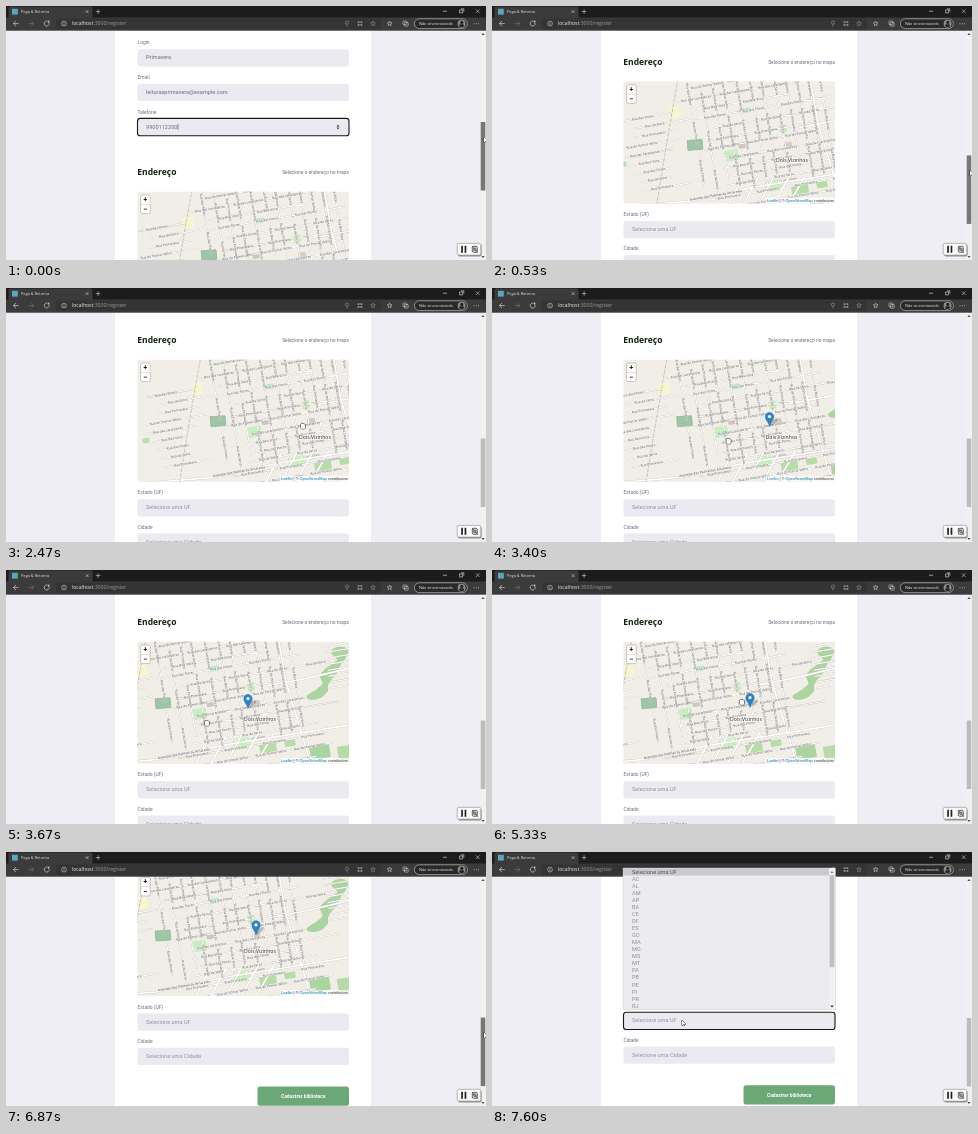
An HTML page with a canvas for the animation above (8 s loop, 480 by 254 pixels).

```html
<!DOCTYPE html>
<html lang="pt-BR">
<head>
<meta charset="utf-8">
<title>Cadastro</title>
<style>
html, body { margin: 0; width: 100%; height: 100%; overflow: hidden; background: #efeef4; }
canvas { display: block; width: 100vw; height: 100vh; }
</style>
</head>
<body>
<canvas id="stage"></canvas>
<script>
const W = 480, H = 254, LOOP = 8000, STEP = 200 / 3;
const canvas = document.getElementById('stage');
const c = canvas.getContext('2d');
const dpr = Math.max(1, window.devicePixelRatio || 1);
canvas.width = W * dpr;
canvas.height = H * dpr;

const UI = 'Roboto, sans-serif', CHROME = '"Open Sans", sans-serif', MAP = '"Noto Sans", sans-serif';
const STATES = 'AC AL AM AP BA CE DF ES GO MA MG MS MT PA PB PE PI PR RJ'.split(' ');
const OPEN_LIST = 7330;

// ---- motion ----
const ramp = (t, from, to) => Math.min(1, Math.max(0, (t - from) / (to - from)));
const scrollAt = t => 114 * ramp(t, 67, 550) + 51 * ramp(t, 6400, 6880);
const thumbAt = t => 116 + 0.303 * scrollAt(t);
const panAt = t => {
  const nudge = ramp(t, 1070, 1270), drag = ramp(t, 3270, 3640);
  return [46 + 9 * nudge - 55 * drag, 2 - 2 * nudge];
};

// Pointer moves; without a height the pointer holds the scrollbar thumb.
const MOVES = [
  { from: 935, to: 1270, x: 251, y: 114 },
  { from: 1400, to: 2130, x: 297, y: 138 },
  { from: 2670, to: 3070, x: 256, y: 153 },
  { from: 3270, to: 3640, x: 201, y: 153 },
  { from: 3700, to: 4130, x: 258, y: 137 },
  { from: 4870, to: 5330, x: 250, y: 132 },
  { from: 5600, to: 5800, x: 428, y: 100 },
  { from: 5940, to: 6200, x: 478 },
  { from: 6880, to: 7270, x: 190, y: 168 }
];
function pointerAt(t) {
  const grip = thumbAt(t) + 15;
  let x = 478, y = grip;
  for (const m of MOVES) {
    const p = ramp(t, m.from, m.to);
    x += (m.x - x) * p;
    y += ((m.y ?? grip) - y) * p;
  }
  return [x, y];
}

// Each click puts the pin under the pointer.
function pinAt(t) {
  const click = [5600, 4600, 2470].find(at => at <= t);
  if (!click) return null;
  const [x, y] = pointerAt(click), [px, py] = panAt(click);
  return [x - px, y - py - 71.5];
}

// ---- drawing helpers ----
function rect(x, y, w, h, fill) {
  c.fillStyle = fill;
  c.fillRect(x, y, w, h);
}
function paint(fill, stroke, lw) {
  if (fill) { c.fillStyle = fill; c.fill(); }
  if (stroke) { c.strokeStyle = stroke; c.lineWidth = lw; c.stroke(); }
}
function round(x, y, w, h, r, fill, stroke, lw = 0.7) {
  c.beginPath();
  c.roundRect(x, y, w, h, r);
  paint(fill, stroke, lw);
}
function disc(x, y, r, fill, stroke, lw = 0.7) {
  c.beginPath();
  c.arc(x, y, r, 0, 7);
  paint(fill, stroke, lw);
}
function line(color, lw, ...pts) {
  c.beginPath();
  for (let i = 0; i < pts.length; i += 2) c.lineTo(pts[i], pts[i + 1]);
  paint(null, color, lw);
}
function text(s, x, y, size, fill, family = UI, weight = 400, align = 'left', halo = 0) {
  c.font = `${weight} ${size}px ${family}`;
  c.textAlign = align;
  c.textBaseline = 'middle';
  if (halo) {
    c.strokeStyle = 'rgba(255,255,255,.7)';
    c.lineWidth = halo;
    c.strokeText(s, x, y);
  }
  c.fillStyle = fill;
  c.fillText(s, x, y);
}
// Runs fn in axes moved to x, y and turned.
function placed(x, y, turn, fn) {
  c.save();
  c.translate(x, y);
  c.rotate(turn);
  fn();
  c.restore();
}
// A small triangle pointing up (-1) or down (1).
function triangle(x, y, dir, color, r = 1.7) {
  c.beginPath();
  c.moveTo(x - r, y - dir);
  c.lineTo(x + r, y - dir);
  c.lineTo(x, y + dir);
  paint(color);
}
function cross(x, y, r, color) {
  line(color, 0.6, x - r, y - r, x + r, y + r);
  line(color, 0.6, x - r, y + r, x + r, y - r);
}
function random(seed) {
  return () => (seed = (seed * 16807) % 2147483647) / 2147483647;
}

// ---- map ----
const TILT = -0.17, TOWN = [222, 60];
const NAMES = ['Rua das Flores', 'Rua da Serra', 'Rua Primavera', 'Rua do Pomar Velho', 'Rua das Laranjeiras', 'Rua Boa Vista'];
const streets = new Path2D(), labels = [];

function addStreet(u, v, length, steep, name) {
  streets.moveTo(u, v);
  streets.lineTo(u + (steep ? 0 : length), v + (steep ? length : 0));
  for (let d = 19; d < length - 12; d += 39) {
    labels.push({ x: u + (steep ? 0 : d), y: v + (steep ? d : 0), turn: steep ? Math.PI / 2 : 0, name });
  }
}
(function layTown() {
  const rnd = random(4711);
  for (let u = -62, i = 0; u < 80; u += 10 + rnd() * 4, i++) {
    addStreet(u, -80 + rnd() * 16, 95 + rnd() * 25, true, NAMES[i % 6]);
  }
  for (let v = -66, i = 0; v < 72; v += 8 + rnd() * 4, i++) {
    addStreet(-80 + rnd() * 50, v, 95 + rnd() * 65, false, NAMES[(i + 3) % 6]);
  }
  for (let i = 0; i < 9; i++) addStreet(-145 + rnd() * 30, -45 + i * 9, 30 + rnd() * 40, false, NAMES[i % 6]);
  for (let i = 0; i < 8; i++) addStreet(104, -38 + i * 6, 30, false, '');
})();

const GREENS = [
  { at: [136, 29], size: [11, 11], color: '#f7f6cf' },
  { at: [194, 72], size: [13, 11], color: '#c4f0c0' },
  { at: [207, 27], size: [11, 5], color: '#b5ecca' },
  { at: [245, 45], size: [7, 8], color: '#bdf0b3' },
  { at: [85, 81], size: [7, 5], color: '#b7dfb5' },
  { at: [236, 102], size: [17, 11], color: '#c8f2bd' },
  { at: [262, 106], size: [17, 9], color: '#b4dea6' },
  { at: [284, 101], size: [11, 7], color: '#b4dea6' },
  { at: [314, 110], size: [20, 14], color: '#aad4a0' },
  { at: [339, 112], size: [14, 16], color: '#b8daa9' },
  { at: [204, 62], size: [7, 6], color: '#cdc5be' },
  { at: [250, 61], size: [8, 5], color: '#d5cbc3' },
  { at: [252, 97], size: [14, 4], color: '#cfc8c2' }
];

// Overlapping rough patches along an S-shaped hillside.
function forest() {
  const rnd = random(29);
  for (let i = 0; i <= 24; i++) {
    const p = i / 24, w = 5 + 3 * Math.cos(p * 4 * Math.PI);
    c.beginPath();
    c.ellipse(333 - 25 * p ** 1.8 + 3 * Math.sin(p * 9), 9 + 45 * p, w + rnd(), 3.2 + rnd(), TILT, 0, 7);
    paint('#aad4a0');
  }
}

// Broad avenues: two crossing the town and a fan in the south.
function avenues(color, lw) {
  for (let k = 0; k < 5; k++) line(color, lw, 188 + k * 15, 126, 204 + k * 16, 95 - k);
  line(color, lw, 76, 124, 150, 118, 215, 104, 345, 83);
  line(color, lw, 262, 44, 300, 37, 346, 26);
  line(color, lw, 272, -5, 280, 40, 306, 126);
}

function drawLand() {
  rect(0, -20, W, 180, '#f1eee8');
  forest();
  for (const { at: [x, y], size: [w, h], color } of GREENS) {
    placed(x, y, TILT, () => round(-w / 2, -h / 2, w, h, 1.2, color));
  }
  c.lineCap = c.lineJoin = 'round';
  for (const [color, extra] of [['#c8c2bd', 0.55], ['#fff', 0]]) {
    placed(...TOWN, TILT, () => {
      c.strokeStyle = color;
      c.lineWidth = 1 + extra;
      c.stroke(streets);
    });
    avenues(color, 1.7 + extra);
  }
  c.setLineDash([3, 2]);
  c.beginPath();
  c.moveTo(140, -4);
  c.quadraticCurveTo(130, 50, 118, 126);
  paint(null, '#bab6b2', 0.8);
  c.setLineDash([]);
  placed(157, 61.5, -0.08, () => round(-7.5, -5, 15, 10, 0.5, '#9dc6a6', '#86ae90', 0.6));
}

function drawNames() {
  placed(...TOWN, TILT, () => {
    for (const { x, y, turn, name } of labels) {
      placed(x, y, turn, () => text(name, 0, 0, 3.3, '#55524f', MAP, 500, 'center', 0.7));
    }
  });
  placed(178, 112, TILT, () => text('Avenida das Palmeiras Amarelas', 0, 0, 3.5, '#45423f', MAP, 500, 'center', 0.8));
  text('Dois Vizinhos', 254, 77.5, 5.1, '#333', MAP, 400, 'center', 1.6);
}

function drawPin(x, y) {
  placed(x, y, 0, () => {
    c.beginPath();
    c.ellipse(4, -4, 5, 1.8, -0.7, 0, 7);
    paint('rgba(0,0,0,.22)');
    c.beginPath();
    c.moveTo(0, 0);
    c.bezierCurveTo(-1, -4, -4.2, -6, -4.2, -9.6);
    c.arc(0, -9.6, 4.2, Math.PI, 0);
    c.bezierCurveTo(4.2, -6, 1, -4, 0, 0);
    paint('#2b82c9', '#2a6da3', 0.5);
    disc(0, -9.6, 1.6, '#fff');
  });
}

function drawMap(top, t) {
  const [px, py] = panAt(t), pin = pinAt(t);
  c.save();
  c.beginPath();
  c.roundRect(131.5, top, 211.5, 122, 1.5);
  c.clip();
  placed(px, top + py, 0, () => {
    drawLand();
    drawNames();
    if (pin) drawPin(...pin);
  });

  round(134.6, top + 3.3, 9.6, 18.6, 1.4, '#fff', '#b2b0ad');
  rect(135, top + 12.4, 9, 0.4, '#bbb');
  text('+', 139.4, top + 8.3, 6.6, '#111', UI, 700, 'center');
  rect(137.8, top + 17, 3.2, 0.8, '#111');

  rect(274, top + 116.2, 70, 6, 'rgba(255,255,255,.75)');
  let x = 275;
  ['Leaflet', ' | © ', 'OpenStreetMap', ' contributors'].forEach((s, i) => {
    text(s, x, top + 119.2, 3.85, i % 2 ? '#333' : '#0078a8', '"Liberation Sans", sans-serif');
    x += c.measureText(s).width;
  });
  c.restore();
}

// ---- page ----
function field(label, value, y, focus, color = '#6c6c80') {
  text(label, 131.5, y, 4.9, '#6c6c80');
  round(131.5, y + 6.2, 211.5, 17.3, 2.8, '#ebeaf0', focus && '#181818', 1.1);
  text(value, 140, y + 14.8, 5.6, color);
}

function drawPage(t) {
  const scroll = scrollAt(t), hint = '#9494a2';
  rect(0, 24, W, H, '#efeef4');
  rect(109, 24, 256, H, '#fff');
  placed(0, -scroll, 0, () => {
    field('Login', 'Primavera', 37);
    field('Email', 'leiturasprimavera@example.com', 71.6);
    field('Telefone', '9900112200', 106.2, true);
    rect(140.3 + c.measureText('9900112200').width, 117.8, 0.5, 6, '#222');
    triangle(332, 119.4, -1, '#444', 1.5);
    triangle(332, 122.6, 1, '#444', 1.5);
    text('Endereço', 131.3, 166.5, 8.5, '#12200f', MAP, 700);
    text('Selecione o endereço no mapa', 343, 166.5, 4.9, '#6c6c80', UI, 400, 'right');
    drawMap(185.7, t);
    field('Estado (UF)', 'Selecione uma UF', 319, t >= OPEN_LIST, hint);
    field('Cidade', 'Selecione uma Cidade', 353.2, false, hint);
    round(251.5, 398.3, 91.5, 19.2, 2.8, '#6ca877');
    text('Cadastrar biblioteca', 297.2, 408.2, 4.9, '#fff', UI, 700, 'center');
  });

  const held = t < 1000 || (t >= 6200 && t < 6940);
  rect(474, 24, 6, H, '#f1f1f1');
  rect(474.7, thumbAt(t), 4.6, 68.5, held ? '#777' : '#bcbcbc');
  triangle(477, 28, -1, '#555');
  triangle(477, 251, 1, '#555');
}

function drawOptions() {
  round(131, 16, 212.5, 141.5, 0, '#ecebf0', '#c4c4c8', 0.4);
  rect(131, 16.4, 206, 7.2, '#cbc9ce');
  text('Selecione uma UF', 140, 20, 5.6, '#55555f');
  STATES.forEach((s, i) => text(s, 140, 27.1 + i * 7.05, 5.6, '#8e8e98'));
  rect(337, 16.4, 6, 141, '#f1f1f1');
  rect(337.6, 23.2, 4.8, 92, '#c0c0c0');
  triangle(340, 20, -1, '#888');
  triangle(340, 154.5, 1, '#333');
}

// ---- browser ----
function arrow(x, dir, color) {
  line(color, 0.7, x - 2.7, 17.6, x + 2.7, 17.6);
  line(color, 0.7, x, 15.1, x + 2.7 * dir, 17.6, x, 20.1);
}
function star(x, y, color) {
  c.beginPath();
  for (let i = 0; i < 10; i++) {
    const r = i % 2 ? 1.1 : 2.5, a = i * Math.PI / 5 - Math.PI / 2;
    c.lineTo(x + r * Math.cos(a), y + r * Math.sin(a));
  }
  c.closePath();
  paint(null, color, 0.6);
}

function drawBrowser() {
  const ink = '#cfcfcf', soft = '#8c8c8c';
  rect(0, 0, W, 12, '#1c1c1c');
  round(2.5, 0.5, 84, 14, 2, '#3b3b3b');
  rect(0, 11.5, W, 13.2, '#3b3b3b');
  rect(6, 2.8, 5.8, 5.8, '#57a9bd');
  text('Pega & Retorna', 15, 5.7, 3.9, '#e4e4e4', CHROME);
  cross(81.1, 5.6, 1.4, ink);
  placed(92.1, 5.6, Math.PI / 4, () => cross(0, 0, 1.6, ink));
  line(ink, 0.7, 437, 5.2, 441, 5.2);
  round(453.6, 3.9, 3, 3, 0, null, ink);
  line(ink, 0.7, 455, 2.8, 457.8, 2.8, 457.8, 5.6);
  cross(471.7, 5.2, 1.8, ink);

  arrow(10, -1, ink);
  arrow(25.3, 1, '#707070');
  c.beginPath();
  c.arc(40.7, 17.6, 2.5, -0.5, 5);
  paint(null, ink, 0.7);
  triangle(42.6, 15.7, 1, ink, 1.2);

  round(50, 12.6, 325, 10.6, 2, '#343434');
  disc(58, 17.6, 2.4, null, ink, 0.6);
  rect(57.7, 16.4, 0.6, 2.6, ink);
  text('localhost', 66, 17.7, 5.1, '#ececec', CHROME);
  text(':3000/register', 66 + c.measureText('localhost').width, 17.7, 5.1, '#9a9a9a', CHROME);
  disc(341, 16.6, 1.6, null, soft);
  line(soft, 0.7, 341, 18.3, 341, 20.5);
  for (const dx of [-1.4, 1.4]) for (const dy of [-1.4, 1.4]) rect(353 + dx, 16.6 + dy, 1.9, 1.9, soft);
  star(367, 17.6, soft);
  star(383.7, 17.6, ink);
  round(397, 15, 3.8, 3.6, 0.5, null, ink, 0.6);
  round(398.4, 16.5, 3.8, 3.6, 0.5, null, ink, 0.6);
  round(408.4, 12.8, 53, 9.8, 4.9, '#292929', '#b8b8b8');
  text('Não sincronizando', 413, 17.6, 3.9, '#e8e8e8', CHROME);
  disc(455.6, 17.7, 4, '#8f8984');
  disc(455.8, 16.4, 1.6, '#252424');
  round(453.2, 18.2, 4.8, 2.8, 1.4, '#252424');
  for (let x = 468; x < 473; x += 2.3) disc(x, 17.7, 0.5, ink);
}

function drawRecorder() {
  round(452, 238.6, 23.6, 12, 2, 'rgba(0,0,0,.4)');
  round(451.2, 237.3, 23.6, 11.8, 1.6, '#fafafa', '#999');
  for (const x of [455.2, 458.6]) rect(x, 239.8, 1.7, 7, '#222');
  round(466.3, 240.3, 5, 6, 1.2, '#ddd', '#444', 0.8);
  disc(468.8, 243.3, 1.3, null, '#444');
  line('#444', 0.8, 466, 240, 471.8, 246.8);
}

function drawPointer(x, y, hand) {
  placed(x, y, 0, () => {
    c.beginPath();
    if (hand) {
      for (let i = -1; i <= 2; i++) c.roundRect(i * 1.1 - 1, -2.6 + Math.abs(i) * 0.4, 1.1, 3, 0.5);
      c.roundRect(-2.1, -0.6, 4.4, 3.4, 1.2);
    } else {
      c.moveTo(0, 0);
      c.lineTo(0, 5.6);
      c.lineTo(1.6, 4.2);
      c.lineTo(3.8, 4);
      c.closePath();
    }
    c.lineJoin = 'round';
    c.strokeStyle = '#222';
    c.lineWidth = 0.9;
    c.stroke();
    paint('#fff');
    if (!hand) line('#222', 0.8, 1.7, 4.4, 2.5, 6);
  });
}

function draw(t) {
  const [x, y] = pointerAt(t), top = 185.7 - scrollAt(t);
  const overMap = x > 131 && x < 343 && y > top && y < top + 122;
  c.setTransform(dpr, 0, 0, dpr, 0, 0);
  drawPage(t);
  drawBrowser();
  if (t >= OPEN_LIST) drawOptions();
  drawRecorder();
  drawPointer(x, y, overMap);
}

function frame(now) {
  draw(Math.floor((now % LOOP + 5) / STEP) * STEP + 1);
  requestAnimationFrame(frame);
}
requestAnimationFrame(frame);
</script>
</body>
</html>
```
